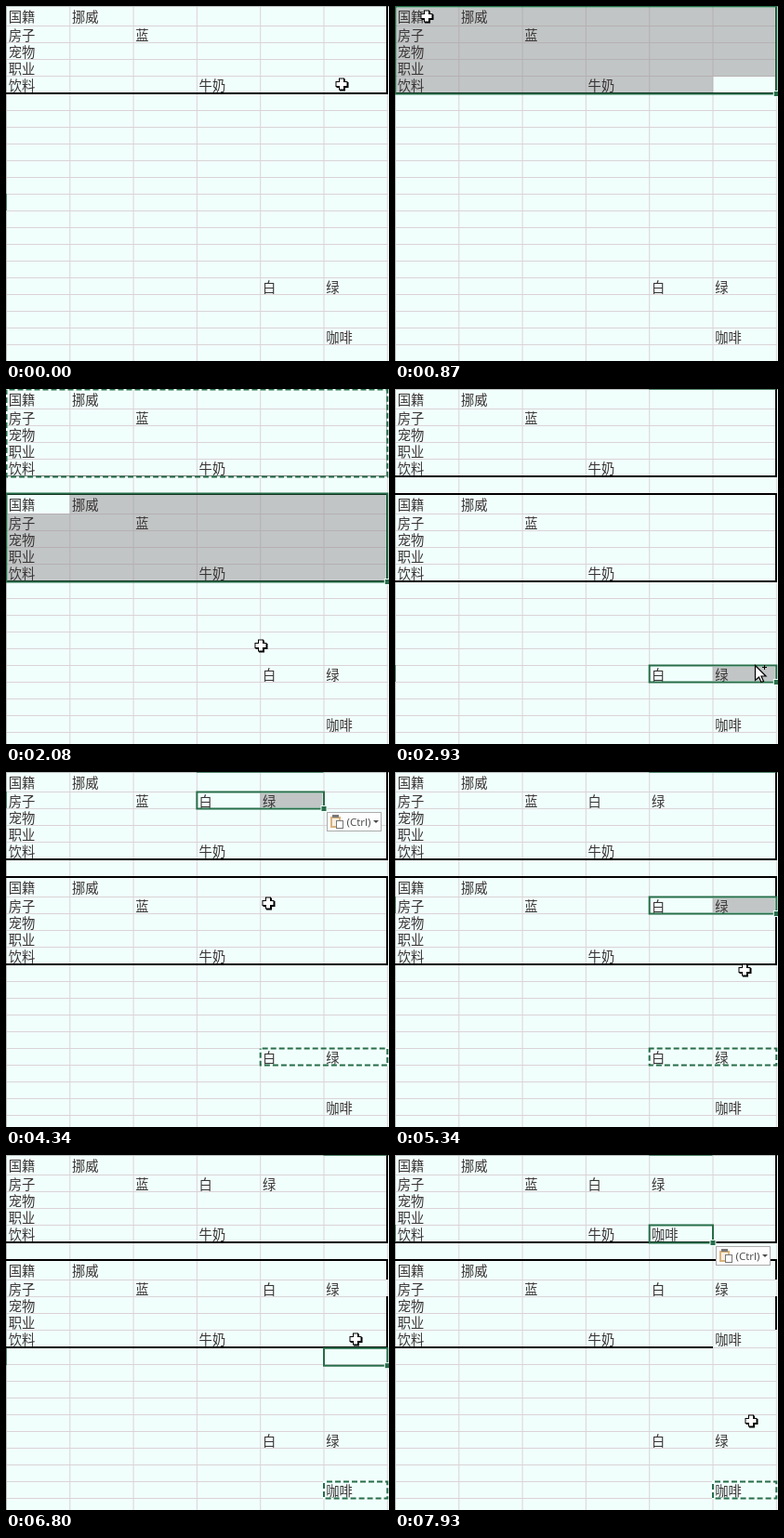
An HTML page with a canvas that plays this animation: 412x382 px, repeating every 7990 ms.

```html
<!DOCTYPE html>
<html lang="zh">
<head>
<meta charset="utf-8">
<title>Spreadsheet puzzle</title>
<style>
  html, body { margin: 0; width: 100%; height: 100%; overflow: hidden; background: #f1fffc; }
  canvas { display: block; }
</style>
</head>
<body>
<canvas id="sheet" width="412" height="382"></canvas>
<script>
const g = document.getElementById('sheet').getContext('2d');
const LOOP = 7990, STEP = LOOP / 120;
const PAPER = '#f1fffc', GRID = '#dbd3d6', GREEN = '#276d49';

// Moments (ms) at which the sheet content changes
const PASTE_BLOCK = 1740, PASTE_D2 = 4070, PASTE_E8 = 4870, PASTE_F11 = 7060, PASTE_E5 = 7660;

const mix = (a, b, p) => a + (b - a) * p;

// Geometry: pasting the block makes its rows slightly taller
const colX = c => c * 68.3;
const rowY = (r, t) => r && 3 + 18 * r + (r >= 5) + (t >= PASTE_BLOCK) * (4 * (r >= 7) + (r >= 11));
const cell = name => [name.charCodeAt(0) - 65, name.slice(1) - 1];

function box(from, to, t) {
  const [c0, r0] = from, [c1, r1] = to;
  return [
    colX(Math.min(c0, c1)), rowY(Math.min(r0, r1), t),
    colX(Math.max(c0, c1) + 1), rowY(Math.max(r0, r1) + 1, t)
  ];
}

// The session is scripted as user actions, which yield pointer and selection keys
const pointer = [], selections = [], copies = [];

const move = (t, x, y) => pointer.push({ t, x, y });
const hold = t => pointer.push({ ...pointer[pointer.length - 1], t });
const select = (t, from, to = from) => selections.push({ t, from, to });
const paste = (t, from, to) => select(t, cell(from), cell(to));
const copy = (start, end, from, to) => copies.push({ start, end, from: cell(from), to: cell(to) });

function moveToCell(t, at) {
  const [x, y, r, b] = box(at, at, t);
  move(t, (x + r) / 2, (y + b) / 2);
}

function click(t, name) {
  moveToCell(t - 80, cell(name));
  hold(t);
  select(t, cell(name));
}

function drag(start, end, from, to) {
  const a = cell(from), b = cell(to);
  const steps = Math.max(Math.abs(a[0] - b[0]), Math.abs(a[1] - b[1]));
  moveToCell(start, a);
  moveToCell(end, b);
  for (let i = 0; i <= steps; i++) {
    const p = i / steps;
    select(mix(start, end, p * .85), a, a.map((v, k) => Math.round(mix(v, b[k], p))));
  }
}

select(-999, cell('H12'));
move(0, 361, 84);
drag(80, 580, 'F5', 'A1');
hold(870);
copy(870, 2200, 'A1', 'F5');
click(1300, 'A7');
move(1540, 177, 195);
move(1680, 215, 224);
paste(PASTE_BLOCK, 'A7', 'F11');
moveToCell(2330, cell('E17'));
drag(2470, 2760, 'E17', 'F17');
move(2930, 387, 297);
hold(3200);
copy(3200, 6270, 'E17', 'F17');
click(3820, 'D2');
hold(4070);
paste(PASTE_D2, 'D2', 'E2');
move(4340, 282, 142);
drag(4450, 4680, 'E8', 'F8');
hold(PASTE_E8);
move(5340, 376, 213);
click(6000, 'F20');
hold(6400);
copy(6270, LOOP, 'F20', 'F20');
click(6705, 'F11');
hold(7200);
click(7470, 'E5');
hold(PASTE_E5);
move(7930, 383, 286);
hold(LOOP + 1);

function fill(color, x, y, w, h) {
  g.fillStyle = color;
  g.fillRect(x, y, w, h);
}

function outline(color, width, [x, y, r, b]) {
  g.strokeStyle = color;
  g.lineWidth = width;
  g.strokeRect(x + .5, y + .5, r - x, b - y);
}

function drawGrid(t) {
  fill(PAPER, 0, 0, 412, 382);
  for (let r = 0; r < 22; r++) fill(GRID, 0, rowY(r, t), 411, 1);
  for (let c = 0; c < 7; c++) fill(GRID, colX(c), 0, 1, 382);
  fill('#b9bebc', 0, 0, 412, 1);
  fill('#b9bebc', 0, 0, 1, 382);
}

// Pasted cells bring no border, so they leave gaps in the heavy frame
function drawBorders(t) {
  const line = (x, y, w, h) => fill('#000', x, y, w, h);
  line(0, 93, 411, 2);
  line(409, 0, 2, 95);
  if (t < PASTE_BLOCK) return;
  line(0, 112, 411, 2);
  line(0, 206, t < PASTE_F11 ? 411 : 342, 2);
  for (let r = 6; r < 11; r++) {
    const replaced = r === 7 && t >= PASTE_E8 || r === 10 && t >= PASTE_F11;
    if (!replaced) line(409, rowY(r, t), 2, rowY(r + 1, t) - rowY(r, t));
  }
}

function drawTexts(t) {
  g.font = '14.3px "Noto Sans CJK SC", "Noto Sans CJK", sans-serif';
  g.fillStyle = '#3a3435';
  const put = (text, c, r) => {
    const top = rowY(r, t), height = rowY(r + 1, t) - top;
    g.fillText(text, colX(c) + 2.7, top + Math.floor(height / 2 + 1) + 5.5);
  };
  const pair = (c, r) => { put('白', c, r); put('绿', c + 1, r); };
  const block = row => {
    ['国籍', '房子', '宠物', '职业', '饮料'].forEach((s, i) => put(s, 0, row + i));
    put('挪威', 1, row);
    put('蓝', 2, row + 1);
    put('牛奶', 3, row + 4);
  };
  block(0);
  pair(4, 16);
  put('咖啡', 5, 19);
  if (t >= PASTE_BLOCK) block(6);
  if (t >= PASTE_D2) pair(3, 1);
  if (t >= PASTE_E8) pair(4, 7);
  if (t >= PASTE_F11) put('咖啡', 5, 10);
  if (t >= PASTE_E5) put('咖啡', 4, 4);
}

// Each selection glides on from wherever the previous one had got to
function selectionAt(t) {
  const past = selections.filter(s => s.t <= t);
  let rect = box(past[0].from, past[0].to, t);
  past.forEach(({ t: start, from, to }, i) => {
    const until = i + 1 < past.length ? past[i + 1].t : t;
    const eased = 1 - (1 - Math.min(1, (until - start) / 170)) ** 3;
    const goal = box(from, to, t);
    rect = rect.map((v, k) => mix(v, goal[k], eased));
  });
  return { rect, ...past[past.length - 1] };
}

function drawSelectionFill({ rect: [x, y, r, b], from, to }, t) {
  if (String(from) === String(to)) return;
  const active = box(from, from, t);
  fill('rgba(150, 145, 148, .52)', x + 2, y + 2, r - x - 3, b - y - 3);
  fill(PAPER, active[0] + 1, active[1] + 1, active[2] - active[0] - 1, active[3] - active[1] - 1);
}

function drawSelectionFrame(rect) {
  const [x, y, r, b] = rect;
  g.globalAlpha = .7;
  fill(GREEN, x, 0, r - x, 1);
  fill(GREEN, 0, y, 1, b - y);
  g.globalAlpha = 1;
  outline(GREEN, 2, rect);
  fill(PAPER, r - 3, b - 3, 7, 7);
  fill(GREEN, r - 2, b - 2, 5, 5);
}

function drawAnts(t) {
  for (const { start, end, from, to } of copies) {
    if (t < start || t >= end) continue;
    const range = box(from, to, t);
    outline(PAPER, 2, range);
    g.setLineDash([6, 3]);
    g.lineDashOffset = -Math.floor(t / STEP);
    outline(GREEN, 2, range);
    g.setLineDash([]);
  }
}

function drawPasteButton(x, y) {
  fill('#fdfdfd', x, y, 59, 21);
  outline('#ababab', 1, [x, y, x + 58, y + 20]);
  fill('#d9b37c', x + 4, y + 5, 11, 12);
  fill('#f8efe2', x + 6, y + 7, 7, 8);
  fill('#777', x + 6, y + 3, 7, 3);
  fill('#fff', x + 10, y + 9, 8, 9);
  outline('#777', 1, [x + 10, y + 9, x + 17, y + 17]);
  g.font = '11.6px "Open Sans", "Noto Sans", sans-serif';
  g.fillStyle = '#4a4a4a';
  g.fillText('(Ctrl)', x + 21.5, y + 15);
  g.beginPath();
  g.moveTo(x + 50, y + 9);
  g.lineTo(x + 56, y + 9);
  g.lineTo(x + 53, y + 12);
  g.fill();
}

function plus(color, x, y, reach, half) {
  fill(color, x - reach, y - half, 2 * reach, 2 * half);
  fill(color, x - half, y - reach, 2 * half, 2 * reach);
}

function drawCross(x, y) {
  plus('#000', x + 1, y + 1, 6.5, 3);
  plus('#000', x, y, 6.5, 3);
  plus('#fff', x, y, 5.5, 2);
}

function drawCopyArrow(x, y) {
  const arrow = new Path2D('M0 0V16L4 12.5L6.5 18L9 17L6.5 11.5H11.5Z');
  g.save();
  g.translate(x + .5, y + .5);
  g.fillStyle = '#fff';
  g.strokeStyle = '#000';
  g.lineWidth = 1.2;
  g.fill(arrow);
  g.stroke(arrow);
  g.restore();
  plus('#000', x + 10.5, y + 2.5, 2.5, .5);
}

function drawPointer(t) {
  const i = pointer.findIndex(key => key.t > t);
  const a = pointer[i - 1], b = pointer[i];
  const p = (t - a.t) / (b.t - a.t), eased = p * p * (3 - 2 * p);
  const x = Math.round(mix(a.x, b.x, eased)), y = Math.round(mix(a.y, b.y, eased));
  const copying = t >= 2850 && t < 3230;
  (copying ? drawCopyArrow : drawCross)(x, y);
}

function draw(t) {
  const selection = selectionAt(t);
  drawGrid(t);
  drawSelectionFill(selection, t);
  drawBorders(t);
  drawTexts(t);
  drawSelectionFrame(selection.rect);
  drawAnts(t);
  if (t >= PASTE_D2 && t < PASTE_E8) drawPasteButton(345, 43);
  if (t >= PASTE_E5) drawPasteButton(345, 98);
  drawPointer(t);
}

const origin = performance.now();
function tick() {
  const t = (performance.now() - origin) % LOOP;
  draw(Math.floor(t / STEP + .01) * STEP % LOOP);
  requestAnimationFrame(tick);
}
tick();
</script>
</body>
</html>
```
